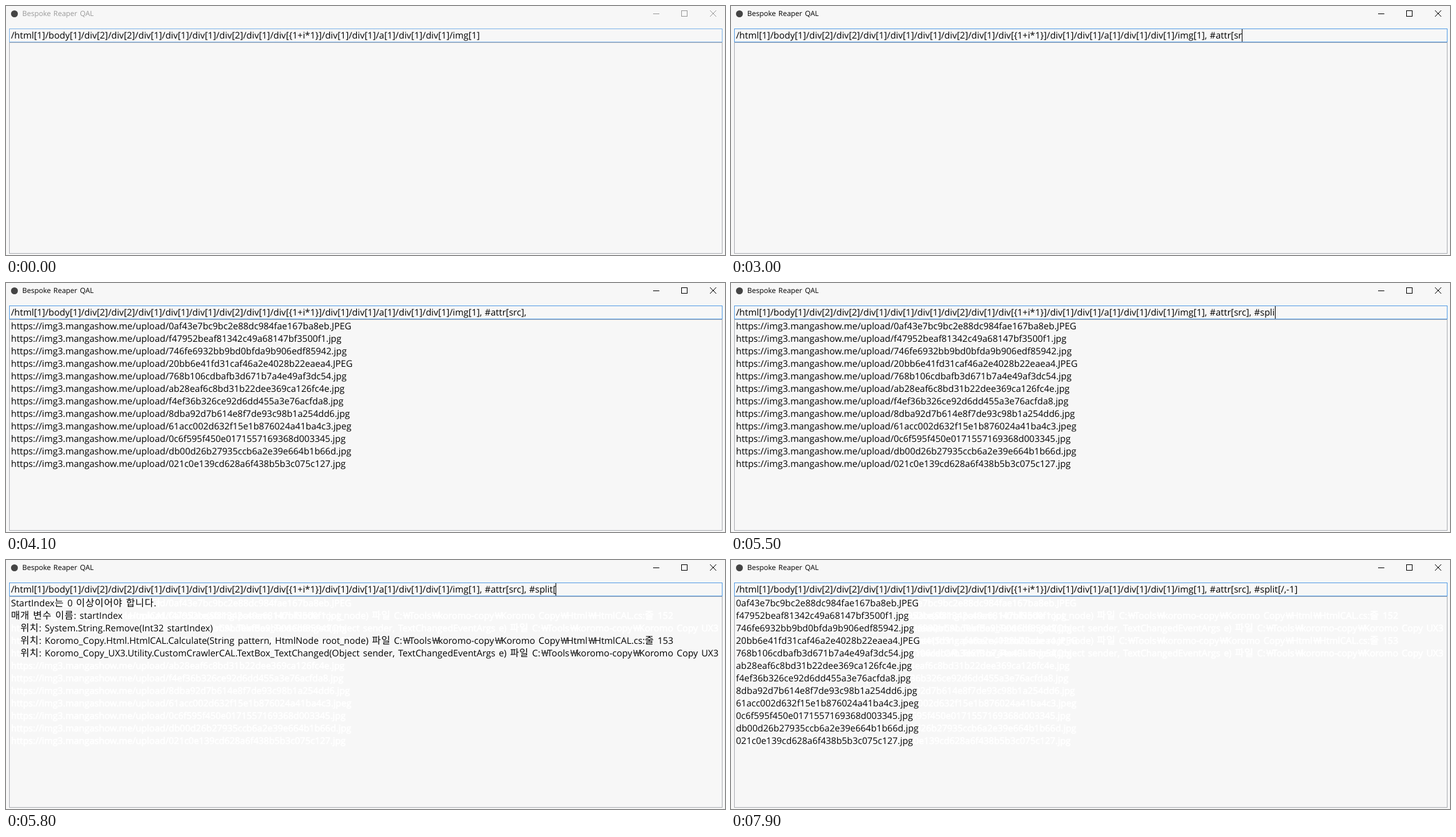
An HTML page that plays this animation: 1150 px wide and 398 px high, repeating every 8000 ms.

```html
<!DOCTYPE html>
<html lang="ko">
<head>
<meta charset="utf-8">
<title>Bespoke Reaper QAL</title>
<style>
html, body { margin: 0; width: 100%; height: 100%; overflow: hidden; background: #f7f7f7; }
#win {
  position: relative; width: 1150px; height: 398px; overflow: hidden;
  font: 14.55px/20px "Open Sans", "Noto Sans", "Noto Sans CJK KR", sans-serif;
  text-rendering: geometricPrecision; white-space: pre; color: #000;
  --ink: #000; --edge: #569de5;
}
#win.idle { --ink: #999; --edge: #7eb4ea; }
#win > * { position: absolute; box-sizing: border-box; }
#icon { left: 8px; top: 7px; width: 11px; height: 11px; border-radius: 50%; background: #444; }
#title { left: 26px; top: 3px; font-size: 11.5px; word-spacing: 1.2px; color: var(--ink); }
#buttons { left: 0; top: 0; fill: none; stroke: var(--ink); }
#field { left: 5px; top: 36px; width: 1141px; height: 22px; border: 1px solid var(--edge); }
#line { left: 8px; top: 37px; width: 1136px; height: 20px; overflow: hidden; font-size: 14.59px; word-spacing: .7px; }
#caret { display: inline-block; width: 1px; height: 20px; vertical-align: top; background: #000; }
#box { left: 5px; top: 58px; width: 1141px; height: 338px; border: 1px solid #abadb3; }
.out { left: 8px; top: 59px; width: 1137px; height: 336px; overflow: hidden; word-spacing: 1.8px; visibility: hidden; }
.out.now { visibility: visible; }
.out.old { visibility: visible; color: #fff; -webkit-text-stroke: .7px #fff; }
.out div { height: 20px; }
.ko, .won { font-family: "Noto Sans CJK KR", "Noto Sans CJK", sans-serif; line-height: 0; }
.ko { font-size: 15.5px; letter-spacing: .6px; }
.won { font-size: 14.4px; letter-spacing: -3.2px; }
</style>
</head>
<body>
<div id="win" class="idle">
  <div id="icon"></div>
  <div id="title">Bespoke Reaper QAL</div>
  <svg id="buttons" width="1150" height="30">
    <path d="M1035 12.5h10M1080.5 7.5h9v9h-9z" shape-rendering="crispEdges"/>
    <path d="M1126 7l10 10m0 -10l-10 10"/>
  </svg>
  <div id="box"></div>
  <div id="field"></div>
  <div id="line"><span id="text"></span><span id="caret"></span></div>
</div>
<script>
const LOOP = 8000;
const $ = id => document.getElementById(id);
const win = $('win'), text = $('text'), caret = $('caret');

const path = '/html[1]/body[1]/div[2]/div[2]/div[1]/div[1]/div[1]/div[2]/div[1]' +
  '/div[{1+i*1}]/div[1]/div[1]/a[1]/div[1]/div[1]/img[1]';
const typed = ', #attr[src], #split[/,-1]';
const keyTimes = [1000, 1500, 1800, 2300, 2400, 2600, 2800, 2900, 3000, 3000, 3200, 3300, 3500,
  4500, 4800, 5100, 5200, 5300, 5500, 5600, 5800, 6500, 6900, 7200, 7300, 7400];
const caretOff = [[0, 300], [800, 1000], [4100, 4500], [6300, 6500], [7900, LOOP]];

const files = `0af43e7bc9bc2e88dc984fae167ba8eb.JPEG
f47952beaf81342c49a68147bf3500f1.jpg
746fe6932bb9bd0bfda9b906edf85942.jpg
20bb6e41fd31caf46a2e4028b22eaea4.JPEG
768b106cdbafb3d671b7a4e49af3dc54.jpg
ab28eaf6c8bd31b22dee369ca126fc4e.jpg
f4ef36b326ce92d6dd455a3e76acfda8.jpg
8dba92d7b614e8f7de93c98b1a254dd6.jpg
61acc002d632f15e1b876024a41ba4c3.jpeg
0c6f595f450e0171557169368d003345.jpg
db00d26b27935ccb6a2e39e664b1b66d.jpg
021c0e139cd628a6f438b5b3c075c127.jpg`.split('\n');

const at = '   위치: ';
const root = ' 파일 C:￦Tools￦koromo-copy￦Koromo Copy';
const trace = line => [
  at + 'Koromo_Copy.Html.HtmlCAL.Calculate(String pattern, HtmlNode root_node)' +
    root + '￦Html￦HtmlCAL.cs:줄 ' + line,
  at + 'Koromo_Copy_UX3.Utility.CustomCrawlerCAL.TextBox_TextChanged(Object sender, TextChangedEventArgs e)' +
    root + ' UX3'
];

// Each result replaces the one before, which stays as a faint white trace.
const results = [
  [3300, files.map(f => 'https://img3.mangashow.me/upload/' + f)],
  [5600, ['인덱스가 배열 범위를 벗어났습니다.', ...trace(152)]],
  [5800, ['StartIndex는 0 이상이어야 합니다.', '매개 변수 이름: startIndex',
    at + 'System.String.Remove(Int32 startIndex)', ...trace(153)]],
  [7400, files]
].map(([start, rows]) => {
  const el = document.createElement('div');
  el.innerHTML = rows.map(r => '<div>' + r
    .replace(/[가-힣]+/g, '<span class="ko">$&</span>')
    .replace(/￦/g, '<span class="won">$&</span>') + '</div>').join('');
  win.append(el);
  return { start, el };
});

function draw(now) {
  const t = now % LOOP;
  win.className = t < 200 ? 'idle' : '';
  const value = path + typed.slice(0, keyTimes.filter(k => k <= t).length);
  if (text.textContent !== value) text.textContent = value;
  caret.style.visibility = caretOff.some(([a, b]) => t >= a && t < b) ? 'hidden' : 'visible';
  results.forEach(({ start, el }, i) => {
    const next = results[i + 1];
    el.className = 'out' + (t < start ? '' : next && t >= next.start ? ' old' : ' now');
  });
}

let begin;
function tick(now) {
  begin ??= now;
  draw(now - begin);
  requestAnimationFrame(tick);
}
draw(0);
requestAnimationFrame(tick);
</script>
</body>
</html>
```
